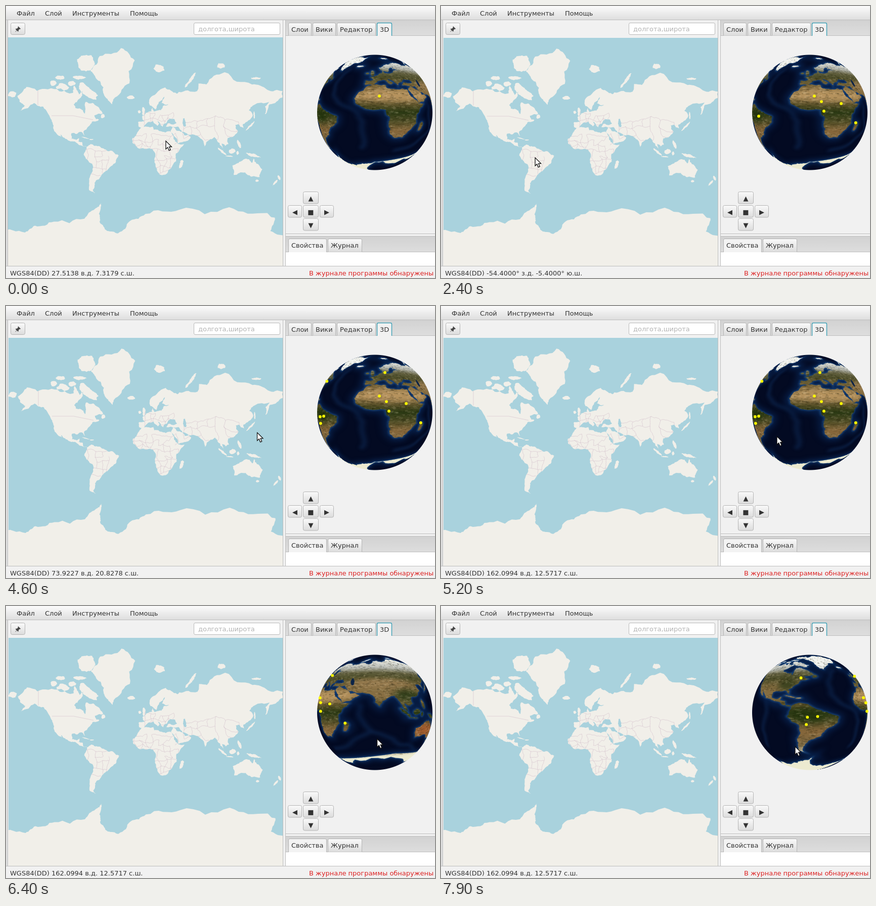
These frames come from a looping animation (848x538 px, 8000 ms). An HTML page with a canvas:

```html
<!DOCTYPE html>
<html lang="ru">
<head>
<meta charset="utf-8">
<style>
  html, body { margin: 0; width: 848px; height: 538px; overflow: hidden; background: #f1f1f1; }
  svg, canvas, #view { position: absolute; left: 0; top: 0; }
  #view { left: 4px; top: 62px; width: 543px; height: 452px; overflow: hidden; }
  #globe { left: 613px; top: 95px; }
  text { font: 13px "DejaVu Sans", sans-serif; fill: #333; white-space: pre; }
  .btn { fill: url(#face); stroke: #b4b4b4; }
  .line { fill: none; stroke: #bdbdbd; }
  .mid { text-anchor: middle; }
</style>
</head>
<body>
<svg id="ui" width="848" height="538">
  <defs>
    <linearGradient id="bar" x2="0" y2="1"><stop stop-color="#fbfbfb"/><stop offset="1" stop-color="#dedede"/></linearGradient>
    <linearGradient id="face" x2="0" y2="1"><stop stop-color="#fafafa"/><stop offset="1" stop-color="#dcdcdc"/></linearGradient>
    <linearGradient id="strip" x2="0" y2="1"><stop stop-color="#d2d2d2"/><stop offset="1" stop-color="#dddddd"/></linearGradient>
  </defs>
  <rect width="848" height="27" fill="url(#bar)"/>
  <rect y="28" width="3" height="486" fill="#dedede"/>
  <rect x="553" y="28" width="295" height="30" fill="url(#strip)"/>
  <rect x="553" y="456" width="295" height="30" fill="url(#strip)"/>
  <rect x="553" y="487" width="295" height="27" fill="#fff"/>
  <path class="line" d="M0 27.5H848M3.5 28V514M547.5 28V514M552.5 28V514M553 58.5H848M553 450.5H848M553 455.5H848M553 486.5H848M0 514.5H848"/>
  <rect class="btn" x="9.5" y="33.5" width="28" height="23" rx="3"/>
  <path fill="#444" d="M24 40l5 5-1 1-1-.4-2.3 2.2.1 2-1 1-2.2-2.2-3 2.7-.4-.4 2.7-3-2.2-2.2 1-1 2 .1 2.2-2.3-.4-1z"/>
  <rect x="371.5" y="33.5" width="170" height="23" rx="2.5" fill="#fff" stroke="#b8b8b8"/>
  <text x="380" y="50" style="fill:#b3b3b3">долгота,широта</text>
  <text id="status" x="8" y="533"></text>
  <text x="599" y="533" style="fill:#d22">В журнале программы обнаружены</text>
</svg>
<div id="view"><canvas id="map" width="543" height="452"></canvas></div>
<canvas id="globe" width="232" height="232"></canvas>
<svg id="pointer" width="18" height="24" viewBox="-1 -1 18 24" style="left:-1px;top:-1px">
  <path d="M0 0V16l3.7-3.4 2.5 6.1 3-1.2-2.6-6H11.5z" fill="#fff" stroke="#111" stroke-width="1.3"/>
</svg>

<script>
const $ = id => document.getElementById(id);
const rad = deg => deg * Math.PI / 180;
const clamp = (v, lo, hi) => Math.max(lo, Math.min(hi, v));
let seed = 7;
const rand = () => (seed = seed * 16807 % 2147483647) / 2147483647;
const jitter = size => (rand() - .5) * size;

// Panel widgets
const add = markup => $('ui').insertAdjacentHTML('beforeend', markup);
const label = (x, y, s, cls = '') => add(`<text x="${x}" y="${y}" class="${cls}">${s}</text>`);
function tab(x, w, top, base, s, style = '') {
  add(`<path class="btn" style="${style}" d="M${x}.5 ${base}V${top + 3}q0-2.5 2.5-2.5h${w - 5}q2.5 0 2.5 2.5V${base}"/>`);
  label(x + 6, top + 18, s);
}
function button(x, y, w, s) {
  add(`<rect class="btn" x="${x}.5" y="${y}.5" width="${w}" height="23.5" rx="3"/>`);
  label(x + .5 + w / 2, y + 17.5, s, 'mid');
}
label(21, 19, 'Файл'); label(77, 19, 'Слой'); label(131, 19, 'Инструменты'); label(245, 19, 'Помощь');
tab(558, 45, 33, 58.5, 'Слои');
tab(606, 45, 33, 58.5, 'Вики');
tab(654, 76, 33, 58.5, 'Редактор');
tab(733, 29, 33, 59, '3D', 'fill:#f1f1f1;stroke:#45a3b8;stroke-width:1.5');
tab(558, 75, 460, 487, 'Свойства', 'fill:#f3f3f3');
tab(636, 67, 460, 486.5, 'Журнал');
button(587, 367, 30, '▲'); button(557, 394, 27, '◀'); button(587, 394, 30, '■');
button(620, 394, 27, '▶'); button(587, 420, 30, '▼');

// Key points of the coasts as longitude,latitude; the detail is fractal
const parse = s => s.trim().split(/\s+/).map(p => p.split(',').map(Number));
const northAmerica = `-168,66 -156,71.3 -128,70 -95,68 -94,72 -87,67 -82,69 -87,64 -94,60 -92,57 -82,55 -80,51.5 -79,55
  -78,62 -70,61 -65,59 -56,52 -67,50 -65,46 -61,45.6 -70,43 -76,36 -81,31 -80,25 -84,30 -97,28 -97,20 -91,18.5 -87,21
  -88,16 -83,15 -82,9 -77,8.4 -85,10 -95,16 -105,20 -113,31 -110,23 -121,35 -124,46 -134,58 -146,61 -164,54.6 -158,59 -165,62`;
const southAmerica = `-77,8 -72,12 -60,8.5 -50,1 -35,-6 -39,-17 -48,-26 -58,-36 -65,-42 -69,-52 -66,-55 -74,-52 -73,-38
  -70,-19 -81,-5 -78,3`;
const africa = `-6,35.8 10,37 11,33 20,31 32,31 37,20 43,12 51,12 40,-3 40.5,-15 35,-23 27,-34 19,-34.5 12,-17 13,-8 9,4
  -7,4.4 -17,14 -17,21 -10,30`;
const greenland = '-72,78 -60,82 -32,83.6 -14,81 -21,73 -40,65 -44,60 -52,65 -55,71 -66,76';
const eurasia = `-9,37 -9,43 -1.5,43.5 -4.5,48.4 8,54 9,57.5 11,54 20,55 24,59 30,60 21.3,61 25,65.5 18,62 14,55.5 6,59 5,62
  15,68 26,71 41,67.5 44,68.5 68,69 70,73 80,72.5 104,77.5 140,72.5 160,69.7 180,69 180,65 163,60 157,51 157,58 163,62
  142,59.3 136,54.7 141,50 128,40 129,35 122,40 118,39 121.5,31 115,23 108,21 109,12 105,9 100.5,13 103.5,1.4 98,10 94,17
  91,22.5 80,15 77.5,8 73,20 67,25 57,26 48,30 36,36.5 27,37 29,41 41,41.6 38,46 31,46 28,42 24,40 22.5,36.6 19.5,41
  13,45.5 18,40 16,38 10,44 3,42.5 -2,36.8`;
const arabia = '33,31 35,28.5 43,13 52,16 59.5,22.5 56,26 51,25 48,30 43,37 36,36.5';
const australia = `114,-22 122,-18 130,-12 136,-12 140,-17.6 142.5,-11 146,-19 153.5,-27 150,-37.5 139,-37 131,-31.5 116,-35`;
const antarctica = `-190,-78 -158,-78 -145,-75.5 -120,-73.8 -80,-72.5 -66,-67 -58,-63 -61,-70 -60,-74 -50,-77.5 -36,-78.3
  -20,-73.5 0,-70 45,-67.5 110,-66 160,-69.5 170,-72 164,-77.5 190,-78.5 190,-88 -190,-88`;

// An island is a wobbly ellipse: centre, half axes, tilt
const blob = (lon, lat, rx, ry, tilt = 0) => Array.from({ length: 12 }, (_, i) => {
  const a = i * Math.PI / 6, k = 1 + jitter(.35), x = rx * k * Math.cos(a), y = ry * k * Math.sin(a);
  return [lon + x * Math.cos(tilt) - y * Math.sin(tilt), lat + x * Math.sin(tilt) + y * Math.cos(tilt)];
});
const arctic = [blob(-75, 68.5, 13, 3, -.3), blob(-109, 71, 8, 2), blob(-121, 73, 4, 1.3), blob(-78, 80, 12, 2.2),
  blob(-87, 75.5, 8, .8), blob(-112, 75.5, 6, .8), blob(-97, 73, 5, 1.1), blob(18, 78.7, 7, 1.2), blob(58, 73.8, 8, .9, .4),
  blob(99, 79.5, 5, .8), blob(145, 75.2, 6, .5), blob(-175, 67, 6, 1.7)];
const atlantic = [blob(-56, 49, 2.5, 2), blob(-79, 21.5, 5, .7, -.3), blob(-71, 19, 2.7, .8), blob(-19, 65, 5, 1.3),
  blob(-2.5, 54, 2, 4), blob(-8, 53.3, 2, 1.5)];
const eastern = [blob(47, -19, 2.3, 6.8, -.25), blob(143, 50, .9, 4), blob(138, 38, 9, 1.2, .8), blob(123, 12, 2, 6, .3),
  blob(101, 0, 8, 1.5, -.8), blob(110, -7.3, 5, .7, -.1), blob(114, 1, 4.5, 3.6, .7), blob(121, -2, 1.6, 3),
  blob(141, -5.5, 10, 2.3, -.35), blob(146.5, -42, 2, 1.5), blob(175.5, -38.5, 1.5, 3.2, .4), blob(170.5, -44, 4.5, 1.2, .8)];
const land = [northAmerica, southAmerica, africa, greenland, eurasia, arabia, australia, antarctica].map(parse)
  .concat(arctic, atlantic, eastern);
const caspian = blob(51, 42, 2, 4.8, .15);

function fractal(pts, depth, closed) {
  if (!depth) return pts;
  const finer = pts.flatMap(([x, y], i) => {
    if (!closed && i === pts.length - 1) return [[x, y]];
    const [u, v] = pts[(i + 1) % pts.length], k = jitter(.3);
    return [[x, y], [(x + u) / 2 + (y - v) * k, (y + v) / 2 + (u - x) * k]];
  });
  return fractal(finer, depth - 1, closed);
}
function trace(shapes, project, closed = true) {
  const path = new Path2D();
  for (const s of shapes) {
    fractal(s.map(project), 3, closed).forEach((p, i) => path[i ? 'lineTo' : 'moveTo'](...p));
    if (closed) path.closePath();
  }
  return path;
}

// Flat map
const mercator = ([lon, lat]) => [271.5 + lon * 1.506, 226 - 71 * Math.log(Math.tan(rad(45 + lat / 2)))];
// Country lines: a jittered lattice
function mesh(lon0, lat0, lon1, lat1, step) {
  const node = (i, j) => [lon0 + i * step, lat0 + j * step];
  const nodes = [], lines = [];
  for (let i = 0; i * step <= lon1 - lon0; i++) {
    nodes[i] = [];
    for (let j = 0; j * step <= lat1 - lat0; j++) {
      nodes[i][j] = node(i, j).map(v => v + jitter(step * .8));
      if (i && rand() < .8) lines.push([nodes[i - 1][j], nodes[i][j]]);
      if (j && rand() < .8) lines.push([nodes[i][j - 1], nodes[i][j]]);
    }
  }
  return lines;
}
function drawMap() {
  const c = $('map').getContext('2d'), shape = trace(land, mercator);
  c.fillStyle = '#a9d2dd';
  c.fillRect(0, 0, 543, 452);
  c.fillStyle = '#f1efe9';
  c.fill(shape);
  c.save();
  c.clip(shape);
  c.lineWidth = .8;
  c.strokeStyle = 'rgba(190,160,182,.45)';
  c.stroke(trace([...mesh(-76, -34, -44, 6, 9), ...mesh(-15, -30, 45, 32, 8), ...mesh(0, 40, 36, 56, 6),
    ...mesh(46, 22, 118, 50, 12)], mercator, false));
  c.stroke(new Path2D('M86 155H129L168 163M59 99V134M95 200L121 211'));
  c.restore();
  c.fillStyle = '#a9d2dd';
  c.fill(trace([caspian], mercator));
}

// Globe texture, 4 px per degree, land coloured by climate zone
const TW = 1440, TH = 720;
const flat = ([lon, lat]) => [(lon + 180) * 4, (90 - lat) * 4];
const ridges = ['-30,62 -42,25 -15,0 -15,-50', '60,12 70,-25 20,-53', '70,-25 100,-45 150,-55', '-105,20 -115,-50'].map(parse);
function makeTexture() {
  const cv = document.createElement('canvas');
  cv.width = TW; cv.height = TH;
  const c = cv.getContext('2d', { willReadFrequently: true }), shape = trace(land, flat);
  c.fillStyle = '#030a22';
  c.fillRect(0, 0, TW, TH);
  const glow = (path, color, width, blur) => {
    c.filter = `blur(${blur}px)`;
    c.strokeStyle = color;
    c.lineWidth = width;
    c.stroke(path);
  };
  glow(trace(ridges, flat, false), '#0b2249', 14, 9);
  glow(shape, '#071f48', 36, 14);
  glow(shape, '#1a467c', 8, 4);

  const zones = c.createLinearGradient(0, 0, 0, TH);
  const zone = (lat, color) => zones.addColorStop((90 - lat) / 180, color);
  zone(75, '#eceee8'); zone(63, '#b9bcb6'); zone(55, '#62603f'); zone(48, '#4b4c28'); zone(36, '#7d683c');
  zone(22, '#8a7044'); zone(11, '#5c522a'); zone(0, '#2b3a14'); zone(-12, '#4f4d26'); zone(-25, '#86663a');
  zone(-45, '#7d6a44'); zone(-62, '#ecead0');
  c.filter = 'blur(1px)';
  c.fillStyle = zones;
  c.fill(shape);

  c.save();
  c.clip(shape);
  const patch = (color, lon, lat, rx, ry) => {
    c.fillStyle = color;
    c.beginPath();
    c.ellipse(...flat([lon, lat]), rx * 4, ry * 4, 0, 0, 7);
    c.fill();
  };
  c.filter = 'blur(14px)';
  patch('#b6935e', 18, 23, 40, 8);
  patch('#967a4e', 78, 39, 34, 7);
  patch('#34401c', 105, 23, 15, 9);
  patch('#a05c2e', 132, -25, 18, 10);
  patch('#3e4420', -83, 38, 10, 9);
  patch('#26360f', -62, -4, 15, 9);
  patch('#f2f4f0', -42, 74, 30, 14);
  c.filter = 'none';
  for (let i = 0; i < 9000; i++) {
    const tone = rand() < .6 ? 'rgba(20,20,0,.15)' : 'rgba(255,235,190,.1)';
    patch(tone, rand() * 360 - 180, 90 - rand() * 150, .5 + rand() * 2, .3 + rand());
  }
  c.restore();
  c.fillStyle = '#0a2348';
  c.fill(trace([caspian], flat));
  return new Uint32Array(c.getImageData(0, 0, TW, TH).data.buffer);
}

// Sphere in perspective; the texture runs linearly in height
const R = 114, CX = 116, CY = 115.5, D = 6, K = Math.sqrt(D * D - 1), SIZE = 232;
const gc = $('globe').getContext('2d');
const img = gc.createImageData(SIZE, SIZE), out = new Uint32Array(img.data.buffer);
const cells = [];
for (let i = 0; i < SIZE * SIZE; i++) {
  const u = (i % SIZE + .5 - CX) / R, v = (CY - Math.floor(i / SIZE) - .5) / R, r = Math.hypot(u, v);
  const alpha = clamp((1 - r) * R + .5, 0, 1);
  if (!alpha) continue;
  const q = r * r / K / K;
  const z = (q * D + Math.sqrt(Math.max(0, 1 + q - q * D * D))) / (1 + q), m = (D - z) / K;
  const row = clamp(Math.floor((1 - v * m) * TH / 2), 0, TH - 1);
  cells.push([i, row * TW, Math.atan2(u * m, z) * 180 / Math.PI, alpha * 255 << 24]);
}
const texture = makeTexture();
function drawGlobe(spin, t) {
  for (const [i, row, lon, alpha] of cells) {
    const col = Math.floor((lon + spin + 540) * 4) % TW;
    out[i] = texture[row + col] & 0xffffff | alpha;
  }
  gc.putImageData(img, 0, 0);
  gc.fillStyle = '#ff0';
  for (const [from, lon, lat] of clicks) {
    const a = rad(lon - spin), s = lat / 90, w = Math.sqrt(1 - s * s);
    const z = w * Math.cos(a), k = R * K / (D - z);
    if (t < from || z < 1 / D - .03) continue;
    gc.beginPath();
    gc.arc(CX + w * Math.sin(a) * k, CY - s * k, 2.9, 0, 7);
    gc.fill();
  }
}

// Pointer: time, longitude, latitude over the map; then time, x, y over the globe
const clicks = [[0, 4, 21.8], [200, 28.4, 12], [500, 10, 14.4], [800, 12, 1.7], [1600, 46.5, -14.5], [2300, -54.4, -5.4],
  [2500, -63, -6.3], [2800, -64, -16], [3900, -70, 47], [4200, 11.3, 55]];
const passing = [[0, 27.5138, 7.3179], [1300, 44.7514, -9.1943], [3300, -63.9779, 27.2075], [4300, 11.3, 55],
  [4500, 73.9227, 20.8278], [4620, 162.0994, 12.5717]];
const drags = [[4800, 560, 255], [4900, 560, 255], [5200, 664, 258], [5700, 602, 251], [6360, 745, 262], [6800, 620, 272],
  [7300, 812, 281], [7900, 700, 278]];
const LEFT_MAP = 4620, GRAB = 5200, LAG = 100;
const toScreen = ([t, lon, lat]) => [t, 274.5 + lon * 1.506, 285.4 - lat * 2.511];
const route = [...clicks.slice(1), ...passing].sort((a, b) => a[0] - b[0]).map(toScreen).concat(drags);

function pointerAt(t) {
  const n = route.findIndex(p => p[0] > t);
  if (n < 1) return n ? route[route.length - 1] : route[0];
  const a = route[n - 1], b = route[n], f = (t - a[0]) / (b[0] - a[0]);
  return a.map((v, i) => v + (b[i] - v) * f);
}
// Every pull to the left turns the globe one degree per pixel
function spinAt(t) {
  const pulls = [...route.filter(p => p[0] >= GRAB && p[0] <= t), pointerAt(t)];
  return t < GRAB ? 0 : pulls.reduce((sum, p, i) => sum + (i ? Math.max(0, pulls[i - 1][1] - p[1]) : 0), 0);
}
function statusAt(t) {
  const [, x, y] = pointerAt(clamp(t - LAG, 0, LEFT_MAP));
  const lon = (x - 274.5) / 1.506, lat = (285.4 - y) / 2.511;
  const [east, north] = lon < 0 ? ['° з.д.', '° ю.ш.'] : [' в.д.', ' с.ш.'];
  return `WGS84(DD) ${lon.toFixed(4)}${east} ${lat.toFixed(4)}${north}`;
}

let shown = -1;
function tick(now) {
  const t = Math.floor(now % 8000 / 100) * 100;
  if (t !== shown) {
    shown = t;
    const [, x, y] = pointerAt(t);
    $('status').textContent = statusAt(t);
    $('pointer').style.transform = `translate(${x}px,${y}px)`;
    $('map').style.transform = t < 1000 ? 'none' : 'translate(1px,1px)';
    drawGlobe(spinAt(t), t);
  }
  requestAnimationFrame(tick);
}
drawMap();
tick(0);
</script>
</body>
</html>
```
